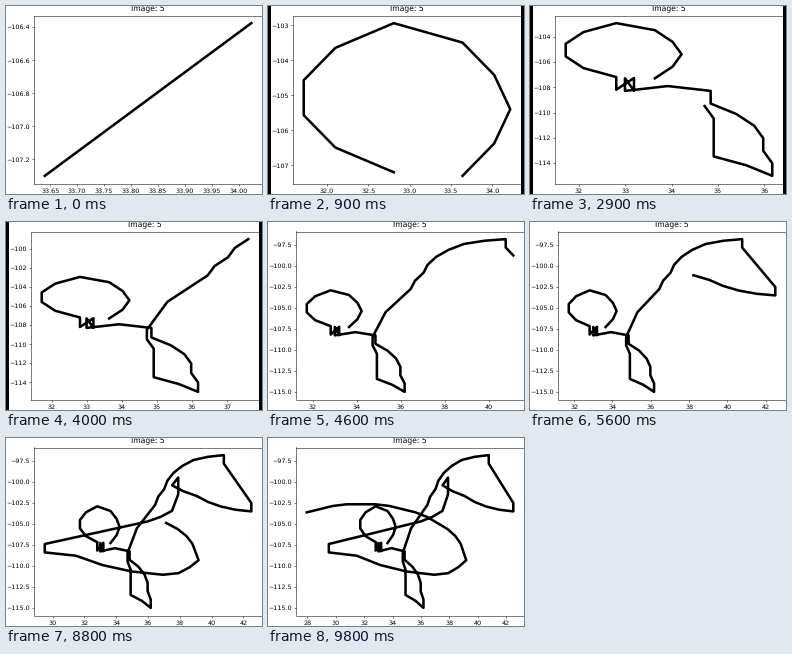
Animation, 256 px wide and 188 px high, one loop 9900 ms. Source, as a matplotlib script:

```python
import matplotlib.pyplot as plt
import numpy as np
from matplotlib.animation import FuncAnimation
from matplotlib.patches import Rectangle

W, H, DPI = 256, 188, 100
SCALE = 0.458               # size of the page relative to a default figure
AXES_W, AXES_H = 227.2, 168
LEFT, BOTTOM = 28, 10.5     # axes corner before centring
UP, DOWN = 0, 16            # headings are 32nds of a turn, clockwise from up

plt.rcParams.update({"font.family": "DejaVu Sans", "text.hinting": "none"})


def turn(first, last, steps):
    """Headings that swing evenly from first to last."""
    return np.round(np.linspace(first, last, steps))


def straight(heading, steps=1):
    return np.full(steps, heading)


def walk(start, *parts):
    """Points reached by unit steps along the joined headings."""
    angles = np.concatenate(parts) * np.pi / 16
    steps = np.column_stack([np.sin(angles), np.cos(angles)])
    return start + np.vstack([[0, 0], np.cumsum(steps, axis=0)])


path = walk(
    (33.64, -107.3),
    # round loop and the knot below it
    turn(2, -2, 4), straight(-5), turn(-12, -20, 5),
    [DOWN, 2, DOWN, -1, DOWN],
    # down one side of the leg and up the other
    turn(6, 10, 2), straight(DOWN), turn(13, 16, 4), turn(15, 16, 2),
    turn(-3, -4, 2), straight(UP, 3), straight(-1), straight(UP),
    # long climb, then the upper right corner and back
    turn(1, 2, 6), np.tile([1, 2], 2), turn(3, 7, 4),
    straight(DOWN), straight(14.2, 5), straight(DOWN),
    turn(-7, -4, 4), turn(-5, -4, 2),
    # hook, long run to the left
    straight(2), straight(DOWN, 2), straight(-15, 2), turn(-12, -11, 2),
    straight(-10, 7), straight(DOWN),
    # wide sweep around the right side
    straight(9, 2), turn(11, 9, 6), straight(7), turn(4, 3, 2),
    straight(-1, 2), turn(-2, -5, 5), turn(-5.5, -10.5, 8),
)

fig = plt.figure(figsize=(W / DPI, H / DPI), dpi=DPI, facecolor="black")
page = fig.add_artist(Rectangle((0, 0), 1, 1, fc="white", lw=0, zorder=-1,
                                transform=fig.transFigure))
ax = fig.add_axes([0.1, 0.05, 0.88, 0.9])
line, = ax.plot([], [], color="black")


def place(left, zoom):
    bottom = H / 2 - (H / 2 - BOTTOM) * zoom
    ax.set_position([left / W, bottom / H, AXES_W * zoom / W, AXES_H * zoom / H])


def style(scale):
    ax.tick_params(labelsize=10 * scale, length=3.5 * scale,
                   width=0.8 * scale, pad=3.5 * scale)
    for spine in ax.spines.values():
        spine.set_linewidth(0.8 * scale)
    ax.set_title("Image: 5", fontsize=12 * scale, pad=6 * scale)
    line.set_linewidth(4 * scale)


def measure(zoom):
    style(SCALE * zoom)
    place(LEFT, zoom)
    return ax.get_tightbbox()


def fit_page():
    """Centre the tightly cropped plot on the stage, shrinking it if too wide."""
    zoom = 1
    box = measure(zoom)
    if box.width > W + 1:
        zoom = W / box.width
        box = measure(zoom)
    place(LEFT + (W - box.x0 - box.x1) / 2, zoom)
    side = max(0, int((W - box.width) / 2))
    edge = round(H * (1 - zoom) / 2)
    page.set_bounds(side / W, edge / H, 1 - 2 * side / W, 1 - 2 * edge / H)


def update(i):
    line.set_data(*path[:i + 2].T)
    ax.relim()
    ax.autoscale_view()
    fit_page()
    return line, page


anim = FuncAnimation(fig, update, frames=len(path) - 1, interval=100,
                     repeat=True, repeat_delay=0, blit=False)
plt.show()
```
